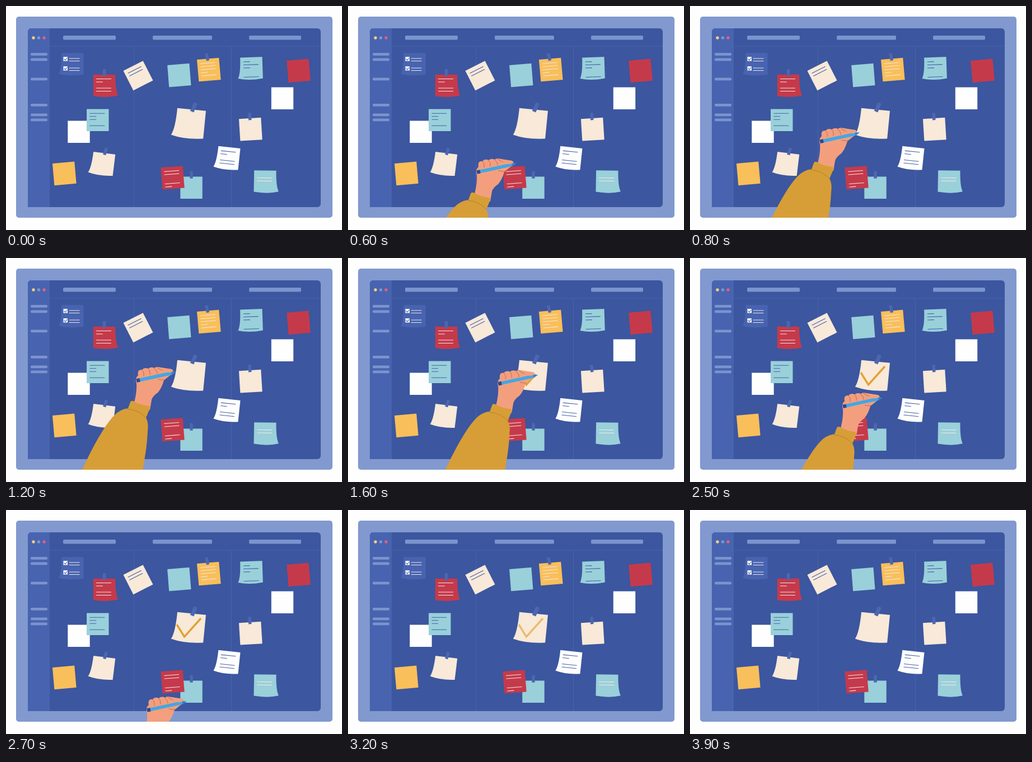
Recreate the animation shown at these times as an HTML page. Size 600 by 401 pixels, loop 4000 ms.

```html
<!DOCTYPE html>
<html lang="en">
<head>
<meta charset="utf-8">
<title>Task board</title>
<style>
  html, body { margin: 0; width: 100%; height: 100%; overflow: hidden; background: #fefefe; }
  svg { display: block; }
  .bar { fill: #7c94ce; }
  .grid { fill: none; stroke: #4963ab; }
  .red { fill: #c53a4b; }
  .teal { fill: #99d0da; }
  .yellow { fill: #f9bf5a; }
  .cream { fill: #f8e9d9; }
  .white { fill: #fefefe; }
  .blue { fill: #4864b0; }
  .tape { fill: #4c66b0; }
  .ink, .chalk { fill: none; stroke-width: 1.1; stroke-linecap: round; }
  .ink { stroke: #4560a6; }
  .chalk { stroke: #f4e6e4; }
  .skin { fill: #f39f7e; }
  .crease { fill: none; stroke: #b9624f; stroke-width: .9; stroke-linecap: round; }
  .sleeve { fill: #d79e37; }
  .seam { fill: none; stroke: #b07c2c; stroke-width: .9; }
  #check { fill: none; stroke: #e2a12f; stroke-width: 3.4; stroke-dasharray: 100 200; }
</style>
</head>
<body>
<svg width="600" height="401" viewBox="0 0 600 401">
  <clipPath id="stage"><path d="M0 0H600V379H0Z"/></clipPath>

  <rect x="18" y="19" width="565" height="360" rx="5" fill="#8199ce"/>
  <path d="M45 40H556a6 6 0 0 1 6 6V354a6 6 0 0 1-6 6H39V46a6 6 0 0 1 6-6Z" fill="#3c569f"/>
  <path class="blue" d="M45 40H78V360H39V46a6 6 0 0 1 6-6Z"/>
  <path class="grid" d="M78 72H562M228.500 72V360M402.500 72V360"/>
  <circle cx="49" cy="57" r="2.700" fill="#f8cf80"/>
  <circle cx="58.500" cy="57" r="2.700" fill="#7c94ce"/>
  <circle cx="68" cy="57" r="2.700" fill="#e2607a"/>
  <g id="board"></g>
  <path id="check" pathLength="100" d="M305 205L318.500 227 348 194"/>

  <g clip-path="url(#stage)">
    <g id="arm">
      <path class="skin" d="M227 288Q234 266 233 248Q230 238 236 233Q234 222 243 223Q247 218 254 221Q259 217 265 220Q268 217 274 218.500L296 222Q300 224 298 229L282 242Q278 256 271 264Q262 270 260 277L257 295Z"/>
      <path d="M236 242L296 229" stroke="#45a6e4" stroke-width="6"/>
      <path d="M233 242.700L239 241.400" stroke="#2d478f" stroke-width="6.500"/>
      <path d="M295 226L304 226.500 296.500 232Z" fill="#3a80c6"/>
      <path class="crease" d="M243 223.500Q247 227 246 234M254 221.500Q258 225 257 232M265 221Q270 224 270 230M270 219Q277 226 295 226M272 240Q278 242 283 241"/>
      <path class="skin" d="M272 219L295 222Q299 224 297 226.500Q291 229 285 227.500Z"/>
      <path class="sleeve" d="M147 379C160 353 178 320 193 305Q203 294 218 292L222 281Q223 278 227 279Q242 287 255 288Q258 289 257 292L250 309Q255 318 253 332Q252 357 248 379L240 430H122Z"/>
      <path class="seam" d="M216 293Q238 295 251 310"/>
    </g>
  </g>
</svg>
<script>
  const LOOP = 4000, STEP = 100;
  const [board, arm, check] = ['board', 'arm', 'check'].map(id => document.getElementById(id));

  const add = markup => { board.innerHTML += markup; };
  const bar = (x, y, w, h) => add(`<rect class="bar" x="${x}" y="${y}" width="${w}" height="${h}" rx="2"/>`);

  // Rows of writing: L is a long line, s a short one, a space an empty row.
  const writing = rows => [...rows].map((row, i) =>
    row === ' ' ? '' : `M-14 ${i * 5.5 - 12}h${row === 'L' ? 26 : 11}`).join('');

  // A sticky note around x, y; curl lifts its right (1) or left (-1) lower corner.
  function note(color, x, y, tilt, { curl = 0, size = 1, tape, rows = '', pen = 'ink' } = {}) {
    const h = 19.7;
    const sheet = curl
      ? `M${-h} ${-h}H${h}Q${h} 8 ${h + 5} ${h - 2}Q5 ${h + 3} ${-h} ${h - 1}Z`
      : `M${-h} ${-h}H${h}V${h}H${-h}Z`;
    const strip = tape === undefined ? ''
      : `<path class="tape" transform="translate(${tape * .15} -23) rotate(${tape})" d="M-2.7-6.5H2.7V6.5H-2.7Z"/>`;
    add(`<g transform="translate(${x} ${y}) rotate(${tilt}) scale(${size})">
      <path class="${color}" transform="scale(${curl || 1} 1)" d="${sheet}"/>
      <path class="${pen}" d="${writing(rows)}"/>${strip}</g>`);
  }

  bar(102, 53, 94, 7.5);
  bar(262, 53, 106, 7.5);
  bar(434, 53, 93, 7.5);
  for (const y of [84, 93.5, 128.5, 175, 192.5, 201.5]) bar(44, y, 30, 4.7);

  note('blue', 119, 104, 0, { curl: -1 });
  for (const y of [91, 108]) {
    add(`<path class="white" d="M102.500 ${y}h7.500v7.500h-7.500Z"/>
      <path class="ink" d="M104 ${y + 4}l2 2 3-4"/>
      <path class="chalk" d="M113 ${y + 3}h18m-18 4.500h18"/>`);
  }
  note('red', 175.5, 142.5, 0, { curl: 1, tape: 0, rows: 'Ls LL', pen: 'chalk' });
  note('cream', 236, 124.7, -27, { rows: 'LL' });
  note('teal', 309.3, 124, -4.5);
  note('yellow', 362.3, 114, -5, { tape: -8, rows: 'LLLsL', pen: 'chalk' });
  note('teal', 438.5, 111.5, -2, { curl: -1, rows: 'sLs  L' });
  note('red', 522.5, 115.8, -5);
  note('white', 493.5, 165.3, 0);
  note('white', 130, 225.2, 0);
  note('teal', 163.8, 204.3, 0, { rows: 'Lss L' });
  note('cream', 329, 210.8, 5.6, { curl: -1, size: 1.3, tape: 18 });
  note('cream', 436.8, 220.7, -3.5, { tape: 0 });
  note('white', 396.8, 272.5, 6, { curl: -1, rows: 'Ls LL' });
  note('yellow', 104.3, 299.8, -5);
  note('cream', 173.3, 283, 7, { curl: -1, tape: 10 });
  note('teal', 331, 325.2, 0, { tape: 0 });
  note('red', 297.5, 307.4, -4.5, { rows: 'LL  Ls', pen: 'chalk' });
  note('teal', 462.5, 314.2, 1, { curl: 1, rows: ' LL', pen: 'chalk' });

  const linear = p => p;
  const easeIn = p => p * p;
  const easeOut = p => 1 - (1 - p) ** 3;
  const progress = (t, from, to) => Math.min(1, Math.max(0, (t - from) / (to - from)));

  // A pose is the arm's x and y and the drawn percentage of the tick.
  const hidden = [-10, 240, 0];
  const moves = [
    { from: 300, to: 1200, pose: [0, -23, 0], ease: easeOut },
    { from: 1200, to: 1400, pose: [13, -2, 36], ease: linear },
    { from: 1400, to: 1750, pose: [52, -29, 100], ease: linear },
    { from: 2200, to: 2900, pose: [-13, 255, 100], ease: easeIn }
  ];
  const poseAt = t => moves.reduce((pose, { from, to, pose: next, ease }) => {
    const p = ease(progress(t, from, to));
    return pose.map((v, i) => v + (next[i] - v) * p);
  }, hidden);

  function draw(now) {
    const t = Math.floor(now % LOOP / STEP) * STEP;
    const [x, y, drawn] = poseAt(t);
    arm.setAttribute('transform', `translate(${x} ${y})`);
    check.style.strokeDashoffset = 100 - drawn;
    check.style.opacity = drawn ? 1 - progress(t, 3050, 3450) : 0;
    requestAnimationFrame(draw);
  }
  draw(performance.now());
</script>
</body>
</html>
```
